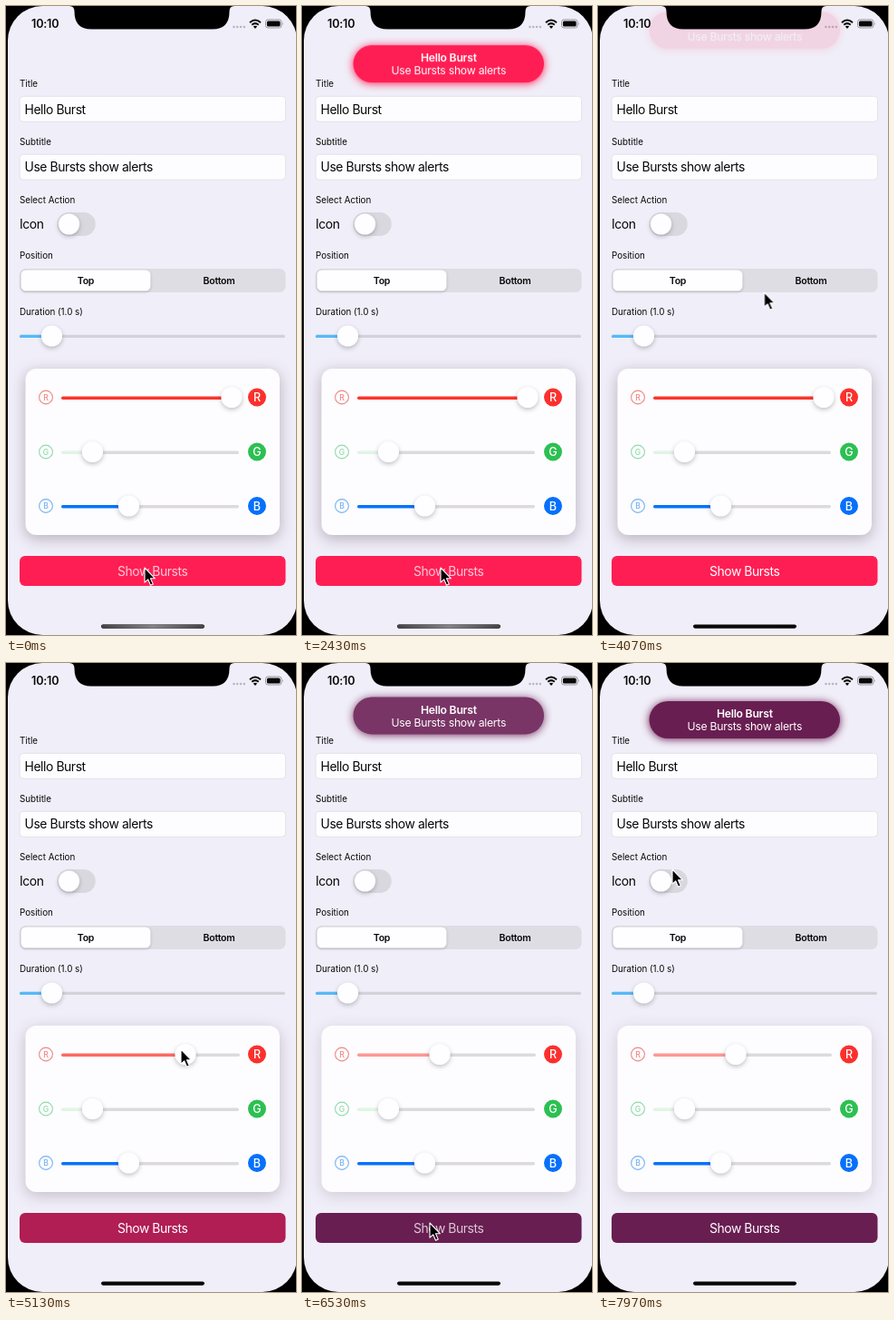
An HTML page that plays this animation: 320 px wide and 692 px high, repeating every 8 s.

```html
<!DOCTYPE html>
<html lang="en">
<head>
<meta charset="utf-8">
<title>Burst alerts</title>
<style>
  /* Red slider value: 1 at the right, 0 at its dragged position. */
  @property --red { syntax: "<number>"; inherits: true; initial-value: 1; }

  html, body { margin: 0; width: 100%; height: 100%; overflow: hidden; background: #000; }
  svg {
    display: block; width: 100%; height: 100%;
    font-family: Inter, Roboto, sans-serif; fill: #080808;
    --tint: rgb(calc(105 + 150 * var(--red)) 30 calc(82 + 2 * var(--red)));
    animation: drag 8s infinite;
  }
  .label { font-size: 9.8px; }
  .body { font-size: 13.9px; letter-spacing: -.03em; }
  .segment { font-size: 10.6px; font-weight: 600; letter-spacing: -.03em; }
  .mid { text-anchor: middle; }
  .field { fill: #fdfcfe; stroke: #dfdde3; stroke-width: .8; }
  .rest { fill: #dcdade; }
  .knob { fill: #fefdff; filter: drop-shadow(0 2px 2.5px rgb(0 0 0 / .24)); }
  .picked { fill: #fefdff; filter: drop-shadow(0 1px 1.5px rgb(0 0 0 / .22)); }
  .card { fill: #fdfcfe; filter: drop-shadow(0 4px 8px rgb(50 30 50 / calc(.16 + .14 * var(--red)))); }
  .ring { fill: none; stroke: currentColor; stroke-width: 1.1; }
  .small { font-size: 8.6px; font-weight: 500; fill: currentColor; }
  .big { font-size: 12.6px; font-weight: 500; fill: #fff; }

  .red-knob { transform: translateX(calc(152px + 97px * var(--red))); }
  .red-fill { width: calc(91px + 97px * var(--red)); fill: #fb372d; opacity: calc(.5 + .5 * var(--red)); }
  .red-rest { x: calc(152px + 97px * var(--red)); width: calc(106px - 97px * var(--red)); }

  .tinted { fill: var(--tint); }
  .glow { filter: drop-shadow(0 1px 5px var(--tint)); }
  .caption { fill: #fff; animation: dim 8s step-end infinite; }
  .alert { animation: alert 8s infinite; }
  .alert text { fill: #fff; font-size: 12.2px; letter-spacing: -.02em; }
  .cursor { animation: point 8s ease-in-out infinite; }
  .home-shade { animation: settle 8s linear infinite; }

  @keyframes drag {
    0%, 57.7% { --red: 1; animation-timing-function: ease-in-out; }
    70.2%, 100% { --red: 0; }
  }
  @keyframes point {
    0%, 32.5% { transform: translate(153px, 618px); }
    42.5%, 48.75% { transform: translate(168px, 287px); }
    55.6%, 57.7% { transform: translate(244px, 425px); }
    70.2%, 71.25% { transform: translate(147px, 425px); }
    76%, 93.6% { transform: translate(141px, 616px); }
    99.4%, 100% { transform: translate(82px, 227px); }
  }
  @keyframes alert {
    0%, 25.125%, 51.25%, 78.625% {
      opacity: 0; transform: translateY(-41px);
      animation-timing-function: linear(0, .165, .456, .714, .886, .98, 1.02, 1.028, 1.024, 1.015, 1.008, 1.003, 1);
    }
    34.125%, 46.5%, 87.625%, 100% {
      opacity: 1; transform: none;
      animation-timing-function: ease-in;
    }
  }
  @keyframes dim {
    0%, 75.5% { opacity: .76; }
    33.5%, 94.5% { opacity: 1; }
    100% { opacity: 1; }
  }
  @keyframes settle {
    0%, 46% { opacity: 1; }
    51%, 100% { opacity: 0; }
  }
</style>
</head>
<body>
<svg viewBox="0 0 320 692">
  <defs>
    <linearGradient id="sheen">
      <stop stop-color="#444246"/>
      <stop offset=".5" stop-color="#858389"/>
      <stop offset="1" stop-color="#444246"/>
    </linearGradient>
    <circle id="knob" class="knob" r="11.6"/>
  </defs>

  <rect width="320" height="692" fill="#000"/>
  <rect x="2" width="319" height="692" rx="38" fill="#f0eef8"/>

  <!-- Status bar -->
  <text x="28" y="24.3" font-size="12.6" font-weight="600" letter-spacing="-.2">10:10</text>
  <g fill="#b9b7bf">
    <circle cx="251.5" cy="23" r="1.3"/><circle cx="255.3" cy="23" r="1.3"/>
    <circle cx="259.1" cy="23" r="1.3"/><circle cx="262.9" cy="23" r="1.3"/>
  </g>
  <g fill="none" stroke="#080808" stroke-width="2">
    <path d="M269 18.2Q275 12.8 281 18.2M271.3 20.8Q275 17.5 278.7 20.8"/>
  </g>
  <path d="M275 25L272.8 22.6Q275 20.8 277.2 22.6Z"/>
  <rect x="286.5" y="15" width="17.5" height="9" rx="2.6" fill="none" stroke="#8d8b92" stroke-width=".9"/>
  <rect x="287.9" y="16.4" width="14.7" height="6.2" rx="1.5"/>
  <path d="M305 18Q306.4 19.5 305 21Z" fill="#8d8b92"/>

  <!-- Form -->
  <g class="label">
    <text x="15" y="88.5">Title</text>
    <text x="15" y="152.5">Subtitle</text>
    <text x="15" y="216.5">Select Action</text>
    <text x="15" y="278.3">Position</text>
    <text x="15" y="339.8">Duration (1.0 s)</text>
  </g>
  <rect class="field" x="15" y="99.3" width="293.5" height="28" rx="4"/>
  <rect class="field" x="15" y="163.2" width="293.5" height="28" rx="4"/>
  <g class="body">
    <text x="20.5" y="118.6">Hello Burst</text>
    <text x="20.5" y="182.4">Use Bursts show alerts</text>
    <text x="15" y="245.3">Icon</text>
  </g>
  <rect x="56.5" y="227" width="42.3" height="26" rx="13" fill="#dad8df"/>
  <use href="#knob" x="69.5" y="240"/>

  <rect x="15" y="289" width="293.5" height="26" rx="6.5" fill="#dfdde4"/>
  <rect class="picked" x="16.5" y="290.5" width="143" height="23" rx="5.5"/>
  <g class="segment mid">
    <text x="88" y="305.8">Top</text>
    <text x="235" y="305.8">Bottom</text>
  </g>

  <rect x="15" y="361.8" width="293" height="3.3" rx="1.6" fill="#d4d2d9"/>
  <rect x="15" y="361.8" width="36" height="3.3" rx="1.6" fill="#55b9f9"/>
  <use href="#knob" x="50.5" y="363"/>

  <!-- Colour sliders -->
  <rect class="card" x="21.5" y="399" width="280.5" height="183" rx="12"/>
  <g transform="translate(0 431)" color="#ee8985">
    <circle class="ring" cx="44" cy="-.5" r="7.4"/>
    <text class="small mid" x="44" y="2.6">R</text>
    <rect class="rest red-rest" y="-1.5" height="3.4" rx="1.7"/>
    <rect class="red-fill" x="61" y="-1.5" height="3.4" rx="1.7"/>
    <g class="red-knob"><use href="#knob" y="-.5"/></g>
    <circle cx="277" cy="-.5" r="10" fill="#fb302d"/>
    <text class="big mid" x="277" y="4.1">R</text>
  </g>
  <g transform="translate(0 491)" color="#90dcaa">
    <circle class="ring" cx="44" cy="-.5" r="7.4"/>
    <text class="small mid" x="44" y="2.6">G</text>
    <rect class="rest" x="95" y="-1.5" width="162" height="3.4" rx="1.7"/>
    <rect x="61" y="-1.5" width="35" height="3.4" rx="1.7" fill="#dff5e5"/>
    <use href="#knob" x="95.5" y="-.5"/>
    <circle cx="277" cy="-.5" r="10" fill="#2cc052"/>
    <text class="big mid" x="277" y="4.1">G</text>
  </g>
  <g transform="translate(0 550.5)" color="#74b2f2">
    <circle class="ring" cx="44" cy="-.5" r="7.4"/>
    <text class="small mid" x="44" y="2.6">B</text>
    <rect class="rest" x="135" y="-1.5" width="122" height="3.4" rx="1.7"/>
    <rect x="61" y="-1.5" width="75" height="3.4" rx="1.7" fill="#0672fb"/>
    <use href="#knob" x="135.5" y="-.5"/>
    <circle cx="277" cy="-.5" r="10" fill="#0570fb"/>
    <text class="big mid" x="277" y="4.1">B</text>
  </g>

  <rect class="tinted" x="15" y="605" width="293.5" height="33" rx="6"/>
  <text class="body mid caption" x="161.7" y="626.7">Show Bursts</text>

  <rect x="105" y="680.5" width="114" height="4.2" rx="2.1"/>
  <rect class="home-shade" x="105" y="680.5" width="114" height="4.2" rx="2.1" fill="url(#sheen)"/>

  <g class="alert">
    <rect class="tinted glow" x="56.5" y="42" width="210.5" height="41" rx="20.5"/>
    <text class="mid" x="161.8" y="60.2" font-weight="600">Hello Burst</text>
    <text class="mid" x="161.8" y="74.2">Use Bursts show alerts</text>
  </g>

  <!-- Notch -->
  <path d="M70 0Q75.5 0 75.5 6Q75.5 25.5 94 25.5H228Q246.5 25.5 246.5 6Q246.5 0 252 0Z" fill="#000"/>

  <path class="cursor" d="M0 0V16.2L3.7 12.8L6.5 19.3L9.3 18.1L6.5 11.8H11.5Z"
        fill="#000" stroke="#fff" stroke-width="1.1" stroke-linejoin="round"/>
</svg>
</body>
</html>
```
